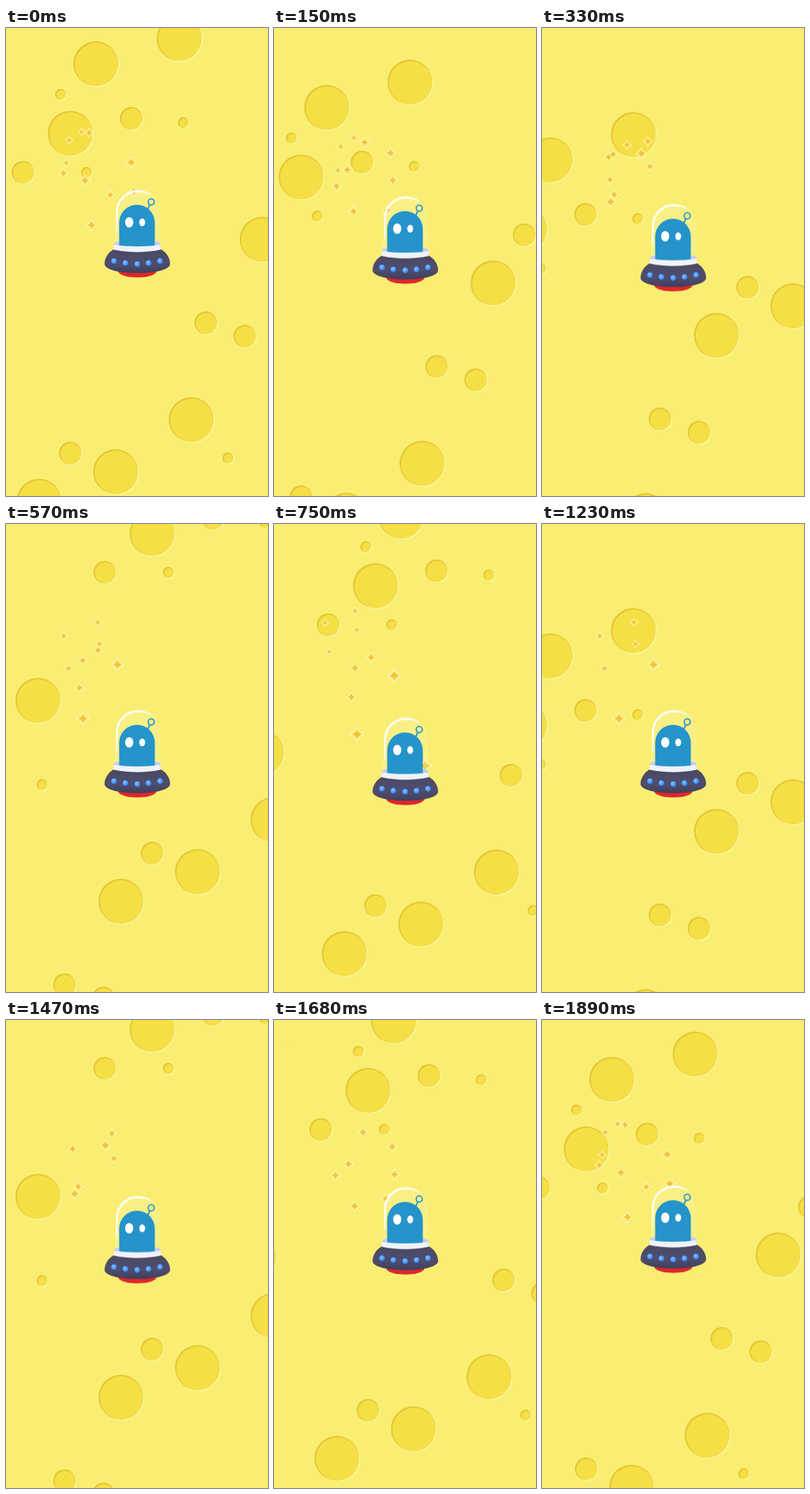
Recreate the animation shown at these times as an HTML page. Size 404 by 720 pixels, loop 1.92 s.

```html
<!DOCTYPE html>
<html lang="en">
<head>
<meta charset="utf-8">
<title>Saucer over a cratered moon</title>
<style>
  html, body {
    margin: 0;
    width: 100%;
    height: 100%;
    overflow: hidden;
    background: #f9ee72;
  }
  svg {
    display: block;
    width: 100%;
    height: 100%;
    overflow: hidden;
    contain: strict;
  }
  /* The small negative delay keeps sample times away from step edges. */
  .field, .ship, .star {
    animation: 1920ms -6ms infinite;
  }
  .field { animation-name: drift; }
  .ship { animation-name: hover; }

  /* Each crater is a round dot: lit rim, shaded rim, floor. */
  #holes path { stroke-width: calc(var(--size) - var(--inset, 0px)); }
  #craters use { stroke-linecap: round; }
  .lit { stroke: #fcf6a4; }
  .shade { stroke: #e4c430; }
  .floor { stroke: #f5df45; --inset: 2.4px; }

  .star {
    transform-box: fill-box;
    transform-origin: center;
    animation-name: pulse;
    fill: #f3c632;
    stroke: #fdf5b4;
    stroke-width: 4.5;
    stroke-linejoin: round;
    paint-order: stroke;
  }
  .grow { --rest: .65; --low: 1; }
  .shrink { --rest: .78; --low: .45; }
  .brief { --rest: .55; --low: .75; animation-name: brief; }

  @keyframes drift {
    0%       { transform: none; animation-timing-function: steps(30); }
    46.875%  { transform: translate(-344px, 403px); }
    46.8751% { transform: none; animation-timing-function: steps(30); }
    93.75%   { transform: translate(-344px, 403px); }
    93.7501% { transform: none; animation-timing-function: steps(4); }
    100%     { transform: translate(-41.3px, 48.4px); }
  }
  @keyframes hover {
    0%      { transform: translateY(0); animation-timing-function: steps(30); }
    46.875% { transform: translateY(58.4px); animation-timing-function: steps(30); }
    93.75%  { transform: translateY(0); animation-timing-function: steps(4); }
    100%    { transform: translateY(7px); }
  }
  @keyframes pulse {
    0%, 93.75%, 100% { transform: scale(var(--rest)); animation-timing-function: steps(30); }
    46.875%          { transform: scale(var(--low)); animation-timing-function: steps(30); }
  }
  @keyframes brief {
    0%, 93.75%, 100% { transform: scale(var(--rest)); animation-timing-function: steps(32); }
    50%              { transform: scale(var(--low)); animation-timing-function: steps(8); }
    62.5%, 86%       { transform: scale(0); animation-timing-function: steps(5); }
  }
</style>
</head>
<body>
<svg viewBox="0 0 404 720">
  <defs>
    <linearGradient id="hull" x1="0" y1="0" x2="0" y2="1">
      <stop offset="0" stop-color="#4a4863"/>
      <stop offset=".6" stop-color="#504e6e"/>
      <stop offset="1" stop-color="#403f5b"/>
    </linearGradient>
    <radialGradient id="glow" cx=".42" cy=".4" r=".6">
      <stop offset="0" stop-color="#8cc4ff"/>
      <stop offset=".6" stop-color="#4f9dfb"/>
      <stop offset="1" stop-color="#3f80ea"/>
    </radialGradient>
    <g id="holes">
      <path style="--size: 69px" d="M138.500 55h0M267 16h0M99 162h0M395 325h0M285.500 602.500h0M169 682.500h0"/>
      <path style="--size: 34.500px" d="M193 139h0M26 222h0M308 453.500h0M368 474h0M99 654h0"/>
      <path style="--size: 16.500px" d="M84 102h0M273.500 145.500h0M124 222h0M342 661.500h0"/>
    </g>
    <g id="craters">
      <use href="#holes" class="lit" x="1.600" y="1.600"/>
      <use href="#holes" class="shade"/>
      <use href="#holes" class="floor" x=".9" y=".9"/>
    </g>
    <path id="spark" d="M0-9Q1.800-1.800 9 0Q1.800 1.800 0 9Q-1.800 1.800-9 0Q-1.800-1.800 0-9Z"/>
    <circle id="lamp" r="4.800" fill="url(#glow)" stroke="#3a4380" stroke-width=".8"/>
  </defs>

  <!-- the pattern repeats along its direction of travel -->
  <g class="field">
    <use href="#craters"/>
    <use href="#craters" x="344" y="-403"/>
    <use href="#craters" x="-344" y="403"/>
  </g>

  <use href="#spark" class="star grow" x="197" y="248"/>
  <use href="#spark" class="star grow" x="136" y="343.500"/>
  <use href="#spark" class="star grow" x="247.500" y="395"/>
  <use href="#spark" class="star shrink" x="247.500" y="265"/>
  <use href="#spark" class="star shrink" x="156" y="301"/>
  <use href="#spark" class="star shrink" x="252.500" y="323"/>
  <use href="#spark" class="star shrink" x="169" y="389"/>
  <use href="#spark" class="star brief" x="212" y="290.500"/>
  <use href="#spark" class="star brief" x="177" y="314"/>
  <use href="#spark" class="star brief" x="169" y="377"/>

  <g class="ship">
    <!-- glass -->
    <path d="M169 334V283a33.500 33.500 0 0 1 67 0V334Z" fill="#fff" fill-opacity=".14" stroke="#fff" stroke-opacity=".25"/>
    <!-- collar, far side -->
    <path d="M166 334Q167 328.500 173.500 328.500H231Q238 328.500 238.500 334V340H166Z" fill="#c6cbee"/>
    <!-- pilot -->
    <path d="M218 280L222 271.500" stroke="#2494cb" stroke-width="2.200"/>
    <circle cx="224" cy="267.500" r="4.700" fill="none" stroke="#2494cb" stroke-width="2"/>
    <path d="M174.500 338V299.500a27.500 27.500 0 0 1 55 0V338Z" fill="#2494cb"/>
    <ellipse cx="190" cy="299" rx="6.300" ry="8" fill="#fff"/>
    <ellipse cx="210" cy="299" rx="4.600" ry="6" fill="#fff"/>
    <!-- glint -->
    <path d="M170 315V283A33 33 0 0 1 203 249.500Q217 249.500 227 258Q216 252.500 203 252.700A30.500 30.500 0 0 0 172.500 284L171.500 315Z" fill="#fff"/>
    <!-- saucer -->
    <ellipse cx="202.500" cy="374" rx="29.500" ry="9.800" fill="#e0262b"/>
    <path d="M167 340C158 345 152 353 152 363C152 371 172 377 202.500 377S253 371 253 363C253 353 247 345 238 340Z" fill="url(#hull)"/>
    <path d="M166 333.500Q202.500 338.500 238.500 333.500V341Q202.500 348.500 166 341Z" fill="#f0f2f8"/>
    <use href="#lamp" x="166.500" y="358.500"/>
    <use href="#lamp" x="184" y="361.500"/>
    <use href="#lamp" x="202.300" y="363"/>
    <use href="#lamp" x="219.700" y="361.500"/>
    <use href="#lamp" x="237.500" y="358.500"/>
  </g>
</svg>
</body>
</html>
```
